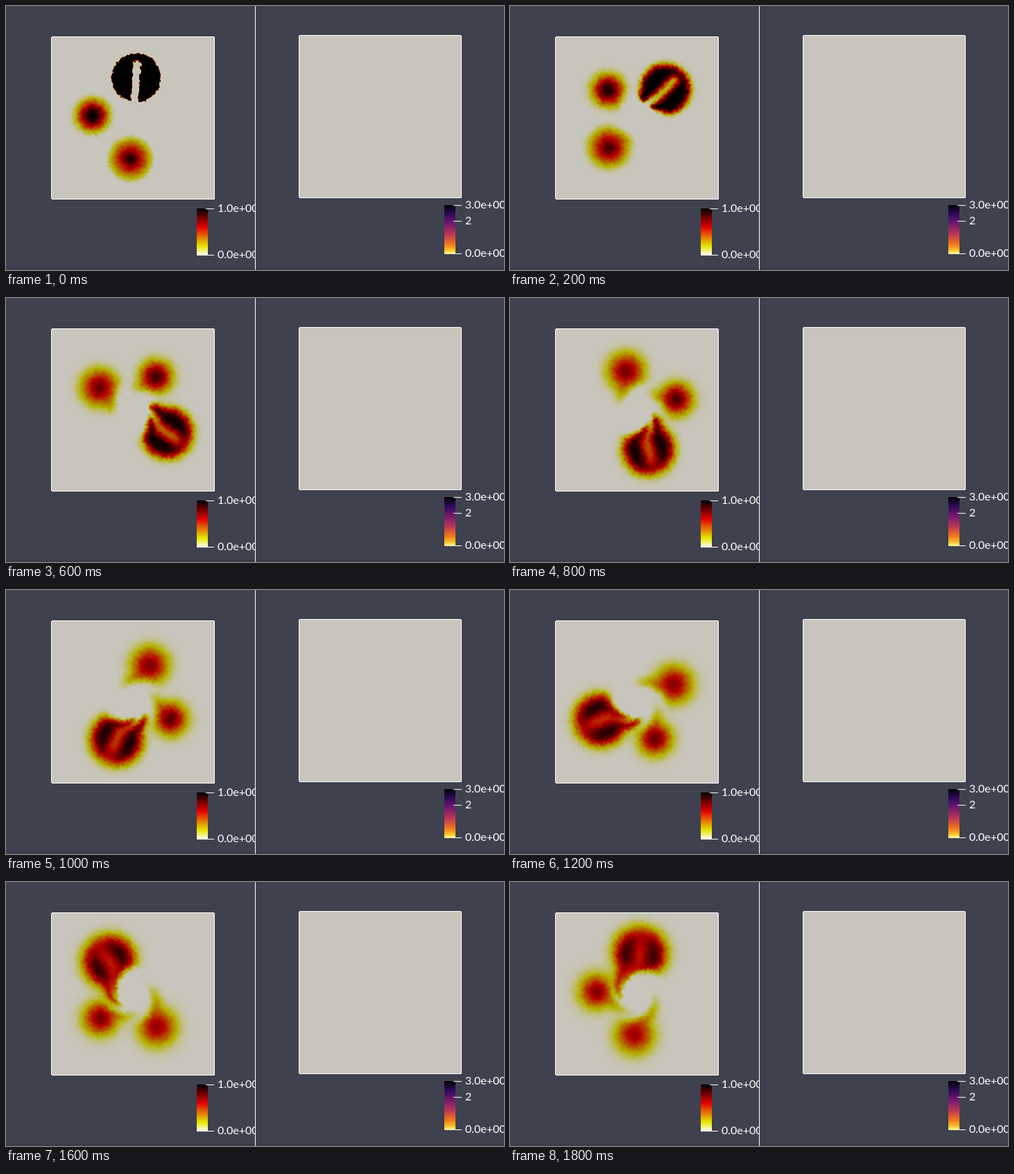
Animation of 718x382 px, one loop 1.9 s. Source, as an HTML page with a canvas:

```html
<!DOCTYPE html>
<html lang="en">
<head>
<meta charset="utf-8">
<title>Solid body rotation</title>
<style>
  html, body { margin: 0; width: 100%; height: 100%; overflow: hidden; background: #3f424e; }
  canvas { display: block; }
</style>
</head>
<body>
<canvas id="stage" width="718" height="382"></canvas>
<script>
const ctx = document.getElementById('stage').getContext('2d');
const N = 235, C = (N - 1) / 2, STEPS = 19, STEP_MS = 100, TURN = Math.PI / 9, START = 0.07;
const clamp = (v, lo = 0, hi = 1) => Math.min(hi, Math.max(lo, v));

function eachCell(fn) {
  for (let y = 0, i = 0; y < N; y++) for (let x = 0; x < N; x++, i++) fn(i, x - C, y - C);
}

// Bilinear lookup at a point turned by an angle about the centre.
function sample(field, x, y, angle) {
  const c = Math.cos(angle), s = Math.sin(angle);
  const u = x * c - y * s + C, v = x * s + y * c + C;
  const i = Math.floor(u), j = Math.floor(v);
  if (i < 0 || j < 0 || i >= N - 1 || j >= N - 1) return 0;
  const a = u - i, b = v - j, k = j * N + i;
  return (field[k] * (1 - a) + field[k + 1] * a) * (1 - b) +
         (field[k + N] * (1 - a) + field[k + N + 1] * a) * b;
}

// Slotted disc on top, smooth hump on the left, cone at the bottom.
function initialField() {
  const field = new Float32Array(N * N), R = 0.15 * N, D = 0.25 * N;
  eachCell((i, x, y) => {
    const disc = Math.hypot(x, y + D) / R;
    const hump = Math.hypot(x + D, y) / R;
    const cone = Math.hypot(x, y - D) / R;
    const slot = Math.abs(x) < 0.025 * N && y > -0.35 * N;
    if (disc < 1) field[i] = slot ? 0 : 1;
    else if (hump < 1) field[i] = (1 + Math.cos(Math.PI * hump)) / 2;
    else if (cone < 1) field[i] = 1 - cone;
  });
  return field;
}

const spread = new Float32Array(N * N);
eachCell((i, x, y) => {
  const r = Math.hypot(x, y);
  spread[i] = Math.min(0.24, 0.2 * clamp((r - 22) / 22) * (0.8 + 0.2 * r / 59));
});

// The flow lags behind near the hub.
function shear(field) {
  const out = field.slice();
  eachCell((i, x, y) => {
    const lag = 0.3 * (1 - (Math.hypot(x, y) - 18) / 26);
    if (lag > 0) out[i] = sample(field, x, y, Math.min(lag, 0.3) * TURN);
  });
  return out;
}

function diffuse(field) {
  const out = field.slice();
  for (let y = 1; y < N - 1; y++) {
    for (let x = 1; x < N - 1; x++) {
      const i = y * N + x, f = field[i], d = spread[i];
      out[i] = f + 0.5 * (
        (d + spread[i - 1]) * (field[i - 1] - f) + (d + spread[i + 1]) * (field[i + 1] - f) +
        (d + spread[i - N]) * (field[i - N] - f) + (d + spread[i + N]) * (field[i + N] - f));
    }
  }
  return out;
}

const fields = [initialField()];
for (let n = 1; n < STEPS; n++) {
  let field = shear(fields[n - 1]);
  const passes = Math.round(26 * (n ** 0.75 - (n - 1) ** 0.75));
  for (let p = 0; p < passes; p++) field = diffuse(field);
  fields.push(field);
}

// Small fixed offsets that give the look of an irregular mesh.
let seed = 7;
const random = () => (seed = (seed * 16807) % 2147483647) / 2147483647;
function meshOffsets() {
  const cell = 3, w = Math.ceil(N / cell) + 2;
  const knots = Array.from({ length: w * w }, () => (random() - 0.5) * 3.4);
  const out = new Float32Array(N * N);
  eachCell((i, x, y) => {
    const u = (x + C) / cell, v = (y + C) / cell, k = Math.floor(v) * w + Math.floor(u);
    const a = u % 1, b = v % 1;
    out[i] = (knots[k] * (1 - a) + knots[k + 1] * a) * (1 - b) +
             (knots[k + w] * (1 - a) + knots[k + w + 1] * a) * b;
  });
  return out;
}
const offsetX = meshOffsets(), offsetY = meshOffsets();

const layer = document.createElement('canvas');
layer.width = layer.height = N;
const layerCtx = layer.getContext('2d');
const image = layerCtx.createImageData(N, N);

// White, yellow, red, black under a warm light.
function drawField(step) {
  const angle = -(START + step * TURN);
  eachCell((i, x, y) => {
    const v = clamp(sample(fields[step], x + offsetX[i], y + offsetY[i], angle));
    const red = v < 0.2 ? 1 - v / 2 : 0.9 * Math.min(1, (1 - v) / 0.4);
    const green = v < 0.2 ? 1 - v / 2 : 0.9 * clamp((0.6 - v) / 0.4);
    image.data.set([200 * red, 197 * green, 188 * clamp(1 - v / 0.2), 255], i * 4);
  });
  layerCtx.putImageData(image, 0, 0);
  ctx.drawImage(layer, 66, 45);
}

function outline(x, y, w, h) {
  ctx.strokeStyle = '#fff';
  ctx.lineWidth = 1;
  ctx.beginPath();
  ctx.roundRect(x + 0.5, y + 0.5, w, h, 1.5);
  ctx.stroke();
}

function colorBar(x, y, h, stops, labels) {
  const gradient = ctx.createLinearGradient(0, y, 0, y + h);
  stops.forEach(([at, color]) => gradient.addColorStop(at, color));
  ctx.fillStyle = gradient;
  ctx.fillRect(x, y, 16, h);
  ctx.fillStyle = '#fff';
  ctx.font = '16px Lato, "Liberation Sans", sans-serif';
  for (const [at, text] of labels) {
    const tickY = y + Math.round(at * (h - 1));
    ctx.fillRect(x + 13, tickY, 12, 1);
    ctx.fillText(text, x + 30, tickY + 5);
  }
}

function drawScene(step) {
  ctx.fillStyle = '#3f424e';
  ctx.fillRect(0, 0, 718, 382);
  ctx.fillStyle = '#3b3d49';
  ctx.fillRect(0, 379, 718, 3);

  ctx.save();
  ctx.beginPath();
  ctx.rect(0, 0, 359, 382);
  ctx.clip();
  drawField(step);
  outline(65, 44, 235, 235);
  colorBar(275, 293, 68,
    [[0, '#000'], [0.4, '#e60000'], [0.8, '#e6e600'], [1, '#fff']],
    [[0, '1.0e+00'], [1, '0.0e+00']]);
  ctx.restore();

  ctx.fillStyle = '#c8c5bc';
  ctx.fillRect(423, 43, 234, 235);
  outline(422, 42, 234, 235);
  colorBar(632, 288, 71,
    [[0, '#000004'], [0.2, '#320a5e'], [0.4, '#781c6d'], [0.6, '#bc3754'],
     [0.8, '#f37819'], [0.92, '#fbc228'], [1, '#fcffa4']],
    [[0, '3.0e+00'], [1 / 3, '2'], [1, '0.0e+00']]);

  ctx.fillStyle = '#fff';
  ctx.fillRect(359, 0, 1, 382);
}

let shown = -1;
function tick() {
  const step = Math.floor(performance.now() / STEP_MS) % STEPS;
  if (step !== shown) drawScene(shown = step);
  requestAnimationFrame(tick);
}
tick();
</script>
</body>
</html>
```
